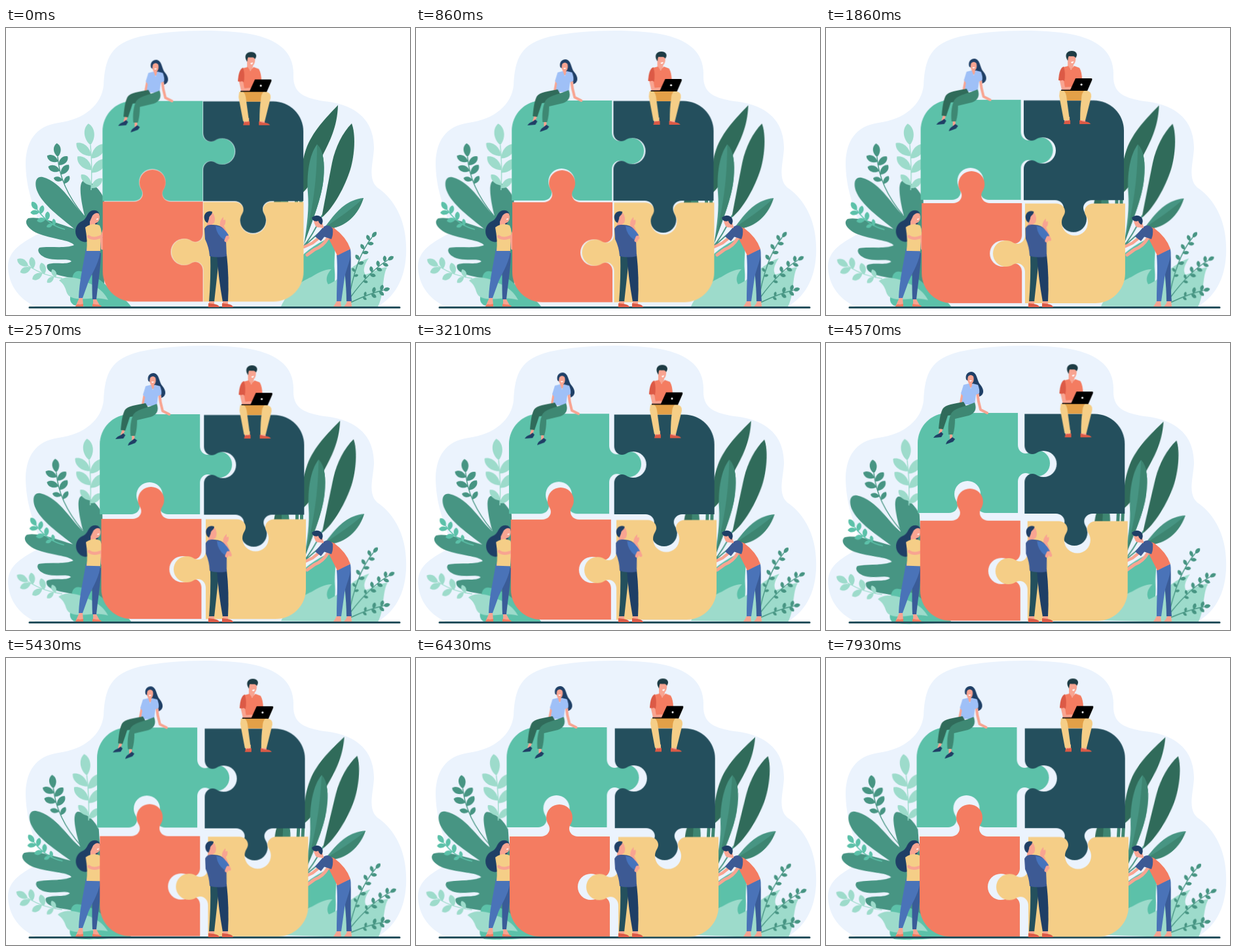
Animation, 617 px wide and 439 px high, one loop 8000 ms. Source, as an HTML page:

```html
<!DOCTYPE html>
<html lang="en">
<head>
<meta charset="utf-8">
<title>Teamwork puzzle</title>
<style>
html, body { margin: 0; width: 100%; height: 100%; overflow: hidden; background: #fff; }
svg { display: block; width: 100vw; height: 100vh; }
.limb { fill: none; stroke-linecap: round; stroke-linejoin: round; }
.skin { fill: #f8a491; }
.limb.skin { fill: none; stroke: #f8a491; }
.ink { fill: #1f3f66; }
.coral { fill: #f47c61; }
.rust { fill: #dc5a46; }
.sand { fill: #f5ce87; }
.mint { fill: #5cc1a9; }
.pale { fill: #9ddbcb; }
.fern { fill: #479583; }
.moss { fill: #3d8571; }
.pine { fill: #306b5a; }
</style>
</head>
<body>
<svg viewBox="0 0 617 439" preserveAspectRatio="none">
  <path fill="#ebf3fd" d="M45 426C18 414 3 390 3 364C4 340 24 328 55 312C46 282 30 250 30 206C31 172 46 150 80 145C120 140 146 117 149 88C151 46 160 24 205 13C252 3 325 1 372 9C420 18 440 40 439 72C438 100 456 107 486 112C534 117 562 140 562 184C561 206 552 230 567 244C590 259 610 290 611 332C613 372 600 408 568 426Z"/>

  <g id="bush">
    <path class="fern" d="M150 402V262C146 250 132 234 119 233C110 236 114 262 120 287C104 274 86 236 56 228C46 226 43 236 47 248C55 270 84 290 104 307C78 298 50 287 34 291C26 297 34 308 48 314C70 323 98 324 104 332C90 338 66 333 51 336C46 341 52 350 66 353C82 356 96 352 100 357C92 363 72 357 63 362C60 370 70 376 84 379C110 384 130 392 150 402Z"/>
  </g>
  <g id="ferns">
    <path class="mint" d="M104 398C98 384 102 370 113 372C134 376 152 390 160 402C174 408 184 416 191 426C166 428 126 428 104 424C94 418 98 408 104 398Z"/>
    <path class="pale" d="M81 386C92 377 112 382 126 390C140 396 150 404 156 416C134 410 116 418 100 412C88 406 96 398 81 386Z"/>
  </g>
  <g id="paleSprig"></g>
  <g id="darkSprig"></g>
  <g id="mintSprig"></g>
  <g id="lowSprig"></g>

  <g id="blades">
    <path class="pine" d="M507 118C488 138 468 158 458 186C452 204 450 222 448 256C466 244 472 222 484 194C494 174 506 152 507 118Z"/>
    <path class="pine" d="M528 146C514 160 503 182 498 206C493 232 488 258 482 290C500 276 518 242 526 216C533 192 534 162 528 146Z"/>
    <path class="fern" d="M475 178C463 194 459 224 461 252C463 276 460 300 455 332C464 304 482 264 485 230C487 206 485 188 475 178Z"/>
    <path class="moss" d="M475 178C475 220 472 262 456 328C468 294 482 262 485 230C487 206 485 188 475 178Z"/>
    <path class="fern" d="M546 260C522 262 506 280 498 290L485 307C508 308 534 296 546 260Z"/>
    <path class="moss" d="M546 260C530 276 508 290 485 307C508 309 536 294 546 260Z"/>
    <path fill="none" stroke="#479583" stroke-width="1.8" d="M453 336Q468 318 483 286M453 336Q472 318 488 305"/>
    <path class="pine" d="M409 300C406 276 409 260 414 254H422V300Z"/>
    <path class="moss" d="M420 300V255H428C433 264 432 284 431 300Z"/>
    <path class="moss" d="M441 300V252H446V300ZM448 300V252H453V300Z"/>
  </g>
  <g id="shrub">
    <path class="mint" d="M445 424V356C458 340 480 326 501 318C505 332 500 352 502 372C504 396 496 412 490 424Z"/>
    <path class="pale" d="M420 426C432 400 450 388 466 381C476 375 486 369 497 369C489 377 488 386 492 392C510 386 526 362 554 352C546 364 545 372 549 377C560 374 572 366 582 366C574 380 578 408 568 426Z"/>
  </g>
  <g id="vines"></g>

  <path stroke="#24505d" stroke-width="3" stroke-linecap="round" d="M36 427.5H601"/>

  <g id="standingWoman">
    <path fill="#3a5c98" d="M132 344H145C145 362 141 388 138 415H132C131 390 132 368 132 344Z"/>
    <path fill="#4a73b8" d="M122 338H144C144 356 133 372 126 388L117 413H111C112 388 118 362 122 338Z"/>
    <path class="skin" d="M112 413H117L118 424H107Q109 419 112 413ZM133 415H138L143 424H133Z"/>
    <path class="coral" d="M106 426Q108 421 113 423L118 422V426ZM132 426V422L138 423Q145 423 146 426Z"/>
    <g id="womanTop">
      <path class="ink" d="M143 287C143 280 135 276 128 281C122 286 124 292 115 296C105 301 103 316 111 323C117 329 126 329 128 322C133 312 140 300 143 287Z"/>
      <path class="skin" d="M132 287Q137 281 142 284Q145 292 140 297L136 299V306H128V296Z"/>
      <path class="sand" d="M121 305Q132 297 143 302Q148 312 144 325V341H123Q125 326 121 305Z"/>
      <path class="limb skin" stroke-width="4.5" d="M126 319Q134 325 147 318L150 309M146 322L147 337"/>
      <path fill="#fff" d="M138 292L141 291Q141 294 138 293Z"/>
    </g>
  </g>

  <g id="pushingMan">
    <path fill="#3a5c98" d="M514 344L526 339C528 358 525 380 528 418H520C520 390 516 366 514 344Z"/>
    <path fill="#4a73b8" d="M505 347L526 338C528 354 520 366 517 382L512 418H505C505 390 507 370 505 347Z"/>
    <path class="skin" d="M505 418H511L512 426H500Q503 422 505 418ZM521 418H527L528 426H516Q520 422 521 418Z"/>
    <path class="limb skin" stroke-width="4.5" d="M478 321L468 329L455 335"/>
    <path fill="#3d5a94" d="M472 319L484 305L492 312L481 326Z"/>
    <path class="coral" d="M485 307Q492 302 501 306Q520 320 526 338L506 348Q496 328 485 307Z"/>
    <path class="limb skin" stroke-width="5" d="M491 322Q484 334 471 339L460 347"/>
    <path fill="#3d5a94" d="M485 304Q493 299 499 307Q500 316 497 323L485 319Z"/>
    <path class="skin" d="M470 295L479 293Q485 299 485 306L478 305Q472 306 470 295Z"/>
    <path class="ink" d="M467 290Q474 284 481 289Q486 294 482 301Q478 299 477 295Q471 297 468 293Z"/>
  </g>

  <g id="pieces"></g>

  <g id="sittingWoman">
    <path class="ink" d="M222 61C220 53 225 49 230 49C239 50 238 61 243 68C250 76 250 84 242 87C242 80 236 74 232 68Z"/>
    <path class="limb skin" stroke-width="4" d="M217 80L214 96M239 80Q240 94 244 107L254 112"/>
    <path class="skin" d="M225 56Q229 52 233 56Q235 63 231 67L232 73L226 74L226 67Q223 62 225 56Z"/>
    <path fill="#9fc0f7" d="M218 69L226 67L229 75L232 67L240 69Q243 76 242 82L237 84L235 99H215L217 86L214 82Z"/>
    <path class="limb skin" stroke-width="4" d="M185 134L182 143M199 140L199 151"/>
    <path class="pine" d="M218 95C204 98 190 99 186 106C182 114 181 126 180 136L187 137C190 128 192 122 194 116L228 112Z"/>
    <path fill="#3e8873" d="M235 96C239 106 235 113 226 116L205 121C205 130 204 138 202 145H195C194 133 195 122 199 113C204 104 222 102 235 96Z"/>
    <path class="ink" d="M172 150Q174 146 180 144L184 141L187 144L184 149ZM191 160Q192 155 196 153L201 149L205 152L202 156Z"/>
    <path fill="#fff" d="M227 62L231 62Q230 64 228 64Z"/>
  </g>

  <g id="sittingMan">
    <path class="skin" d="M368 46Q374 42 380 46Q381 54 377 58L376 65H368V57Z"/>
    <path fill="#1d3b44" d="M366 48C364 41 368 37 374 37C382 37 384 43 380 48C379 44 373 46 370 45C368 47 369 50 368 52Z"/>
    <path fill="#fff" d="M373 54L377 53Q377 56 374 56Z"/>
    <path class="skin" d="M355 79H364L365 93L376 92V97H359Z"/>
    <path class="coral" d="M361 62L369 60L373 66L378 60L386 63Q390 70 390 82L388 98H363Z"/>
    <path class="rust" d="M362 61Q355 63 354 82L363 83Q365 72 362 61Z"/>
    <path class="limb skin" stroke-width="4.5" d="M360 84L362 95L372 94"/>
    <path class="skin" d="M363 143L364 138H371V146H363ZM387 138H395V146H387Z"/>
    <path fill="#e3a048" d="M359 97H398V113H366Z"/>
    <path class="sand" d="M356 98Q364 95 366 106L371 143H362Q358 122 355 106ZM393 98Q405 97 404 107L395 143H387Q387 122 389 110Q389 102 393 98Z"/>
    <path class="rust" d="M362 149Q363 143 367 144L372 143V149ZM386 149V143L392 145Q401 145 403 149Z"/>
    <path d="M358 96.500H372L380 79H404Q406 79 405 82L398 98H358Z"/>
    <circle cx="389" cy="88.500" r="1.500" fill="#fff"/>
  </g>

  <g id="middleMan">
    <path fill="#24505d" d="M312 346H326L318 419H310Q313 382 312 346Z"/>
    <path class="ink" d="M322 346H337Q341 382 339 419H331Q324 380 322 346Z"/>
    <path class="skin" d="M310 418H318V424H310ZM331 418H339V424H331Z"/>
    <path class="rust" d="M309 427V421L317 422Q325 423 326 427ZM330 427V421L338 422Q346 423 347 427Z"/>
    <g id="manTop">
      <path class="skin" d="M307 288L316 283Q321 291 318 298L315 300V306H307Z"/>
      <path class="ink" d="M303 292C301 284 308 278 315 281C315 287 310 286 310 292L308 298Q304 297 303 292Z"/>
      <g id="hand">
        <path class="limb skin" stroke-width="4.5" d="M339 321L330 302"/>
        <path class="skin" d="M327 303Q326 296 330 291L332 289V294L335 293Q337 300 330 305Z"/>
      </g>
      <path fill="#3d5a94" d="M303 307Q306 300 314 301Q327 300 333 308L336 325L337 349Q324 352 311 349Q310 335 304 323Z"/>
      <path fill="#4674bd" d="M320 303Q332 303 340 317L333 324Q322 317 320 303Z"/>
      <path class="limb skin" stroke-width="5" d="M338 320L336 325"/>
    </g>
  </g>
</svg>
<script>
const LOOP = 8000;
const byId = id => document.getElementById(id);

function addPath(group, d, attrs) {
  const path = document.createElementNS('http://www.w3.org/2000/svg', 'path');
  path.setAttribute('d', d);
  for (const name in attrs) path.setAttribute(name, attrs[name]);
  group.append(path);
  return path;
}

// Knob on an edge at (x, y), travelling along (ux, uy); side 1 bulges left, -1 right.
function knob(x, y, ux, uy, side) {
  const at = (along, out) =>
    `${x + along * ux + out * side * uy} ${y + along * uy - out * side * ux} `;
  return `L${at(-28, 0)}C${at(-21, 0)}${at(-15, 5)}${at(-15, 12)}` +
    `C${at(-15, 18)}${at(-20, 20)}${at(-20, 29)}` +
    `A20 20 0 0 ${side > 0 ? 1 : 0} ${at(20, 29)}` +
    `C${at(20, 20)}${at(15, 18)}${at(15, 12)}C${at(15, 5)}${at(21, 0)}${at(28, 0)}`;
}

const corner = 'A46 46 0 0 1 ';
const pieces = [
  { fill: '#5cc1a9', move: [-9.5, -6],
    d: `M148 265V158${corner}194 112H301${knob(301, 189, 0, 1, 1)}V265${knob(224, 265, -1, 0, -1)}H148Z` },
  { fill: '#244f5d', move: [2.7, -4.8],
    d: `M301 112.500H408${corner}454 158.500V265${knob(377, 265, -1, 0, 1)}H301${knob(301, 189, 0, -1, -1)}Z` },
  { fill: '#f47c61', move: [-5, 8],
    d: `M148 265${knob(224, 265, 1, 0, 1)}H301${knob(301, 342, 0, 1, -1)}V418H194${corner}148 372Z` },
  { fill: '#f5ce87', move: [8, 8.3],
    d: `M301 265.500${knob(377, 265.5, 1, 0, -1)}H454V372${corner}408 418H301${knob(301, 342, 0, -1, 1)}Z` }
];

function leaf(group, x, y, angle, length, width, fill) {
  const d = `M0 0C${length * .3} ${-width} ${length * .8} ${-width} ${length} 0` +
    `C${length * .8} ${width} ${length * .3} ${width} 0 0Z`;
  addPath(group, d, { fill, transform: `translate(${x} ${y}) rotate(${angle})` });
}

// Curved stem with leaf pairs between the fractions `from` and `to`, and one leaf at the tip.
function sprig(id, [x0, y0], [x1, y1], [x2, y2], { pairs, from, to = .92, length, width, fill, spread = 54 }) {
  const group = byId(id);
  addPath(group, `M${x0} ${y0}Q${x1} ${y1} ${x2} ${y2}`, { fill: 'none', stroke: fill, 'stroke-width': 1.4 });
  const place = (t, turn, size) => {
    const s = 1 - t;
    const x = s * s * x0 + 2 * s * t * x1 + t * t * x2;
    const y = s * s * y0 + 2 * s * t * y1 + t * t * y2;
    const heading = Math.atan2(s * (y1 - y0) + t * (y2 - y1), s * (x1 - x0) + t * (x2 - x1));
    leaf(group, x, y, heading * 180 / Math.PI + turn, length * size, width * size, fill);
  };
  for (let i = 0; i < pairs; i++) {
    const t = from + (to - from) * i / (pairs - 1);
    const size = i ? 1 : .75;
    place(t, -spread, size);
    place(t - .06, spread, size);
  }
  place(1, 0, 1.1);
}

sprig('paleSprig', [130, 248], [132, 210], [129, 179],
  { pairs: 3, from: .1, to: .74, length: 30, width: 9, fill: '#9ddbcb', spread: 46 });
sprig('darkSprig', [118, 286], [82, 242], [79, 197],
  { pairs: 3, from: .6, length: 19, width: 6.5, fill: '#479583', spread: 56 });
sprig('mintSprig', [90, 308], [65, 302], [48, 278],
  { pairs: 3, from: .4, length: 13.5, width: 4.8, fill: '#5cc1a9' });
sprig('lowSprig', [86, 383], [60, 380], [34, 364],
  { pairs: 3, from: .25, length: 18, width: 6.2, fill: '#9ddbcb' });
const vine = { pairs: 4, from: .4, length: 9.5, width: 3.6, fill: '#479583', spread: 58 };
sprig('vines', [522, 424], [533, 352], [559, 320], vine);
sprig('vines', [526, 412], [555, 372], [583, 355], vine);
sprig('vines', [526, 420], [555, 406], [576, 401], { ...vine, pairs: 3 });

const spreadSteps = [[0, .06], [860, .18], [1860, .36], [3210, .63], [4570, .84], [6000, 1], [LOOP, 1]];
const windSteps = [[0, 0], [860, .04], [1860, .14], [3210, .42], [4570, .75], [6430, .97], [LOOP, 1]];
const swaySteps = [[0, 0], [860, .04], [1860, .65], [3210, 1], [4570, .95], [6430, .08], [LOOP, .04]];

function play(element, steps, pose) {
  const frames = steps.map(([time, amount]) => ({ offset: time / LOOP, transform: pose(amount) }));
  element.animate(frames, { duration: LOOP, iterations: Infinity });
}
const slide = (element, steps, [x, y]) =>
  play(element, steps, p => `translate(${x * p}px, ${y * p}px)`);
function swing(id, steps, origin, degrees) {
  byId(id).style.transformOrigin = origin;
  play(byId(id), steps, p => `rotate(${degrees * p}deg)`);
}

for (const { d, fill, move } of pieces) {
  slide(addPath(byId('pieces'), d, { fill }), spreadSteps, move);
}
slide(byId('sittingWoman'), spreadSteps, [-9.5, -6]);
slide(byId('sittingMan'), spreadSteps, [3, -5.6]);

swing('bush', windSteps, '150px 400px', -4);
swing('ferns', windSteps, '190px 425px', -4);
swing('paleSprig', windSteps, '150px 400px', -1.7);
swing('darkSprig', windSteps, '150px 400px', -2.2);
swing('mintSprig', windSteps, '150px 400px', -2.7);
swing('lowSprig', windSteps, '150px 400px', -2);
swing('blades', windSteps, '455px 330px', 3.1);
swing('shrub', windSteps, '490px 425px', 2);
swing('vines', windSteps, '525px 420px', 3.8);

swing('womanTop', swaySteps, '133px 340px', 2);
swing('manTop', swaySteps, '322px 350px', 3);
slide(byId('hand'), swaySteps, [3, 3]);
</script>
</body>
</html>
```
